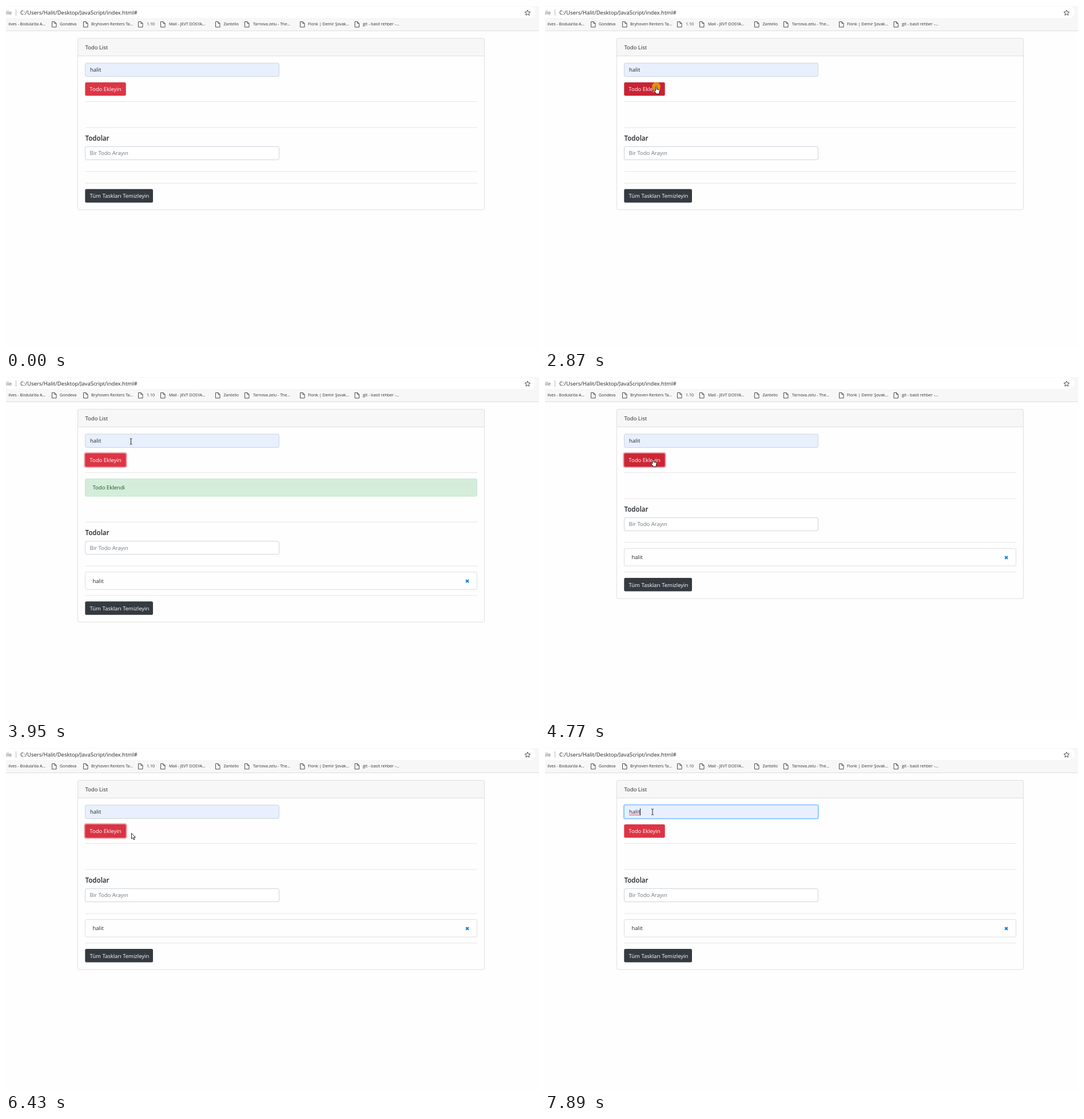
Write an HTML page that moves like this. It is 932 by 601 pixels and loops after 7.99 s.

```html
<!DOCTYPE html>
<html lang="tr">
<head>
<meta charset="utf-8">
<title>Todo List</title>
<style>
html, body { margin: 0; width: 100%; height: 100%; overflow: hidden; background: #fefefe; }
svg { display: block; font: 9.5px "Open Sans", "Noto Sans", sans-serif; fill: #212529; }
.box { fill: #fff; stroke: #ced4da; }
.card { fill: none; stroke: #dfdfdf; }
.hr { stroke: #e5e5e5; }
.hint { fill: #6c757d; }
.light { fill: #fff; }
#bookmarks { font-size: 7.05px; fill: #333; }
.icon { fill: none; stroke: #4a4d51; stroke-width: 1; }
.pointer { fill: #fff; stroke: #111; stroke-width: .9; stroke-linejoin: round; }
</style>
</head>
<body>
<svg width="932" height="601" viewBox="0 0 932 601">
  <rect width="932" height="43" fill="#f7f7f7"/>
  <rect x="-20" y="1" width="946" height="20" rx="10" fill="#fff"/>
  <path d="M0 43.5H932" stroke="#dedede"/>
  <text x="10" y="15" text-anchor="end" fill="#5f6368">ile</text>
  <path d="M17.5 6V17" stroke="#b8babd"/>
  <text x="25" y="15">C:/Users/Halit/Desktop/JavaScript/index.html#</text>
  <path class="icon" d="M912 7l1.4 3.2 3.4.3-2.6 2.3.8 3.4-3-1.8-3 1.8.8-3.4-2.6-2.3 3.4-.3z" stroke-width=".9"/>
  <g id="bookmarks"><text x="69" y="34.3" text-anchor="end">ilves - Bodula'da A...</text></g>

  <rect x="125.5" y="56.5" width="711" height="31" rx="2.5" fill="#f7f7f7"/>
  <path d="M126 87.5H836" stroke="#dfdfdf"/>
  <rect id="card" class="card" x="125.5" y="56.5" width="711" rx="2.5"/>
  <text x="138.5" y="75.5">Todo List</text>

  <rect id="inputRing" x="136.5" y="98.5" width="342.5" height="26.5" rx="3.5" fill="#007bff" fill-opacity=".3"/>
  <rect id="input" x="138.5" y="100" width="339" height="23.5" rx="2.5" fill="#e8f0fe"/>
  <text id="entry" x="147" y="115.3">halit</text>
  <g id="editing">
    <path id="underline" stroke="#e0303a" stroke-width=".9"/>
    <path id="caret" stroke="#111"/>
  </g>

  <rect id="buttonRing" x="136.2" y="131.7" width="75.6" height="27.4" rx="4" fill="#e15361" fill-opacity=".5"/>
  <rect id="button" x="138.3" y="133.8" width="71.4" height="23.4" rx="2.5"/>
  <text class="light" x="146.3" y="149.3">Todo Ekleyin</text>
  <path class="hr" d="M138.5 167.5H824"/>

  <g id="alert">
    <rect id="alertBox" x="138.5" y="178.5" width="685" height="30.5" rx="2.5"/>
    <text id="alertText" x="151.5" y="197.3"></text>
  </g>

  <g id="lower">
    <path class="hr" d="M138.5 213H824M138.5 290H824"/>
    <text x="138.5" y="235.6" font-size="11.6" font-weight="600">Todolar</text>
    <rect class="box" x="138.5" y="246.5" width="339" height="23" rx="2.5"/>
    <text class="hint" x="146.5" y="261.4">Bir Todo Arayın</text>
    <g id="item">
      <rect class="card" x="138.5" y="300.5" width="685" height="30.5" rx="2.5"/>
      <text x="151.5" y="319.4">halit</text>
      <path d="M804.2 314l4.8 4.8m0-4.8l-4.8 4.8" stroke="#1482dc" stroke-width="2.2"/>
    </g>
    <g id="tail">
      <path class="hr" d="M138.5 310.5H824"/>
      <rect x="138.3" y="320.8" width="118.7" height="23.6" rx="2.5" fill="#343a40"/>
      <text class="light" x="146.5" y="336.4">Tüm Taskları Temizleyin</text>
    </g>
  </g>

  <g id="pointer">
    <circle id="press" r="7.5" fill="#e0900f"/>
    <path id="arrow" class="pointer" d="M0 0V9.7L2.3 7.6 3.9 11.3 5.5 10.6 3.9 7H7z"/>
    <path id="hand" class="pointer" d="M-1 .8Q0-.6 1 .8V5L5 5.6Q6.3 6 6.2 7.5L5.3 11V13H-.5V11.6L-3.6 7.8Q-3.4 6.3-2 6.9L-1 8z"/>
    <path id="beam" d="M-2-5H-.6L0-4.4.6-5H2M0-4.4V4.4M-2 5H-.6L0 4.4.6 5H2" fill="none" stroke="#222" stroke-width="1"/>
  </g>
</svg>
<script>
const LOOP = 7990;
const $ = id => document.getElementById(id);
const show = (id, on) => $(id).style.display = on ? "" : "none";
const set = (id, attrs) => { for (const k in attrs) $(id).setAttribute(k, attrs[k]); };
const within = (t, from, to) => t >= from && t < to;

// Tracks are lists of [time, ...values].
const smooth = u => u * u * (3 - 2 * u);
function track(keys, t, ease = u => u) {
  const i = keys.findIndex(k => k[0] > t);
  if (i === 0) return keys[0].slice(1);
  if (i < 0) return keys.at(-1).slice(1);
  const [a, b] = [keys[i - 1], keys[i]];
  const u = ease((t - a[0]) / (b[0] - a[0]));
  return a.slice(1).map((v, n) => v + (b[n + 1] - v) * u);
}
const mix = (a, b, u) => `rgb(${a.map((v, i) => Math.round(v + (b[i] - v) * u))})`;

const pointerPath = [
  [70, 748, 521], [840, 199, 141], [910, 194.5, 141], [3800, 194.5, 141],
  [3950, 218.5, 113], [4260, 218.5, 113], [4770, 189, 144], [4890, 189, 145],
  [5090, 189, 145], [5180, 187.5, 142.5], [6190, 187.5, 142.5], [6430, 219.5, 149.5],
  [6820, 200, 112], [6970, 200, 112], [7300, 105, 114], [7740, 184, 112],
  [7840, 184, 112], [7890, 188, 112]
];
const hoverKeys = [
  [840, 0], [1000, 1], [3800, 1], [3950, 0], [4650, 0], [4800, 1], [6300, 1], [6450, 0]
];
const buttonFocus = [[2900, 0], [3050, 1], [7400, 1], [7550, 0]];
const inputFocus = [[7400, 0], [7550, 1]];
const clicks = [2870, 5340, 7400];
const alerts = [
  { from: 2990, to: 4030, text: "Todo Eklendi", fill: "#d4edda", stroke: "#c3e6cb", color: "#155724" },
  { from: 5400, to: 6400, text: "Aynı todoyu giremessiniz", fill: "#f8d7da", stroke: "#f5c6cb", color: "#721c24" }
];

const bookmarks = [
  [80, 94, "Gondeva"], [135, 149, "Bryhoven Renters Ta..."], [231, 246, "1.10"],
  [270, 285, "Mail - JEVT DOSYA..."], [366, 380.5, "Zantelio"], [417, 432, "Tarnova.zelu - The..."],
  [514, 528, "Flonk | Demir Şovak..."], [609.5, 624, "git - basit rehber -..."]
];
$("bookmarks").innerHTML += bookmarks.map(([icon, x, label]) =>
  `<path class="icon" d="M${icon + .5} 27.5h4.5l3 3v6.5h-7.5zm4.5 0v3h3"/><text x="${x}" y="34.3">${label}</text>`
).join("");

function drawPointer(t) {
  const [x, y] = track(pointerPath, t, t < 840 ? u => 1 - (1 - u) ** 2 : smooth);
  const inside = (x0, y0, x1, y1) => x >= x0 && x <= x1 && y >= y0 && y <= y1;
  const kind = inside(138, 100, 478, 124) ? "beam"
    : inside(138, 134, 210, 158) ? "hand" : "arrow";
  for (const id of ["arrow", "hand", "beam"]) show(id, id === kind);
  show("press", clicks.some(c => within(t, c, c + 80)));
  show("pointer", t >= 70);
  set("pointer", { transform: `translate(${x} ${y})` });
}

function drawPage(t) {
  const alert = alerts.find(a => within(t, a.from, a.to));
  const hasItem = t >= alerts[0].from;
  const alertShift = alert ? 41.2 : 0;
  const itemShift = hasItem ? 31.2 : 0;

  show("alert", alert);
  if (alert) {
    set("alertBox", { fill: alert.fill, stroke: alert.stroke });
    set("alertText", { fill: alert.color });
    $("alertText").textContent = alert.text;
  }
  show("item", hasItem);
  set("lower", { transform: `translate(0 ${alertShift})` });
  set("tail", { transform: `translate(0 ${itemShift})` });
  set("card", { height: 300.5 + alertShift + itemShift });

  const [hover] = track(hoverKeys, t);
  const [focus] = track(inputFocus, t);
  set("button", { fill: mix([220, 53, 69], [200, 35, 51], hover) });
  set("buttonRing", { opacity: track(buttonFocus, t)[0] });
  set("input", { stroke: mix([206, 212, 218], [128, 189, 255], focus) });
  set("inputRing", { opacity: focus });
  show("editing", focus > 0);
  const end = 147 + $("entry").getComputedTextLength();
  set("underline", { d: `M147 117.3H${end}` });
  set("caret", { d: `M${Math.round(end) + .5} 106V118` });
}

function frame(now) {
  const t = now % LOOP;
  drawPage(t);
  drawPointer(t);
  requestAnimationFrame(frame);
}
frame(0);
</script>
</body>
</html>
```
